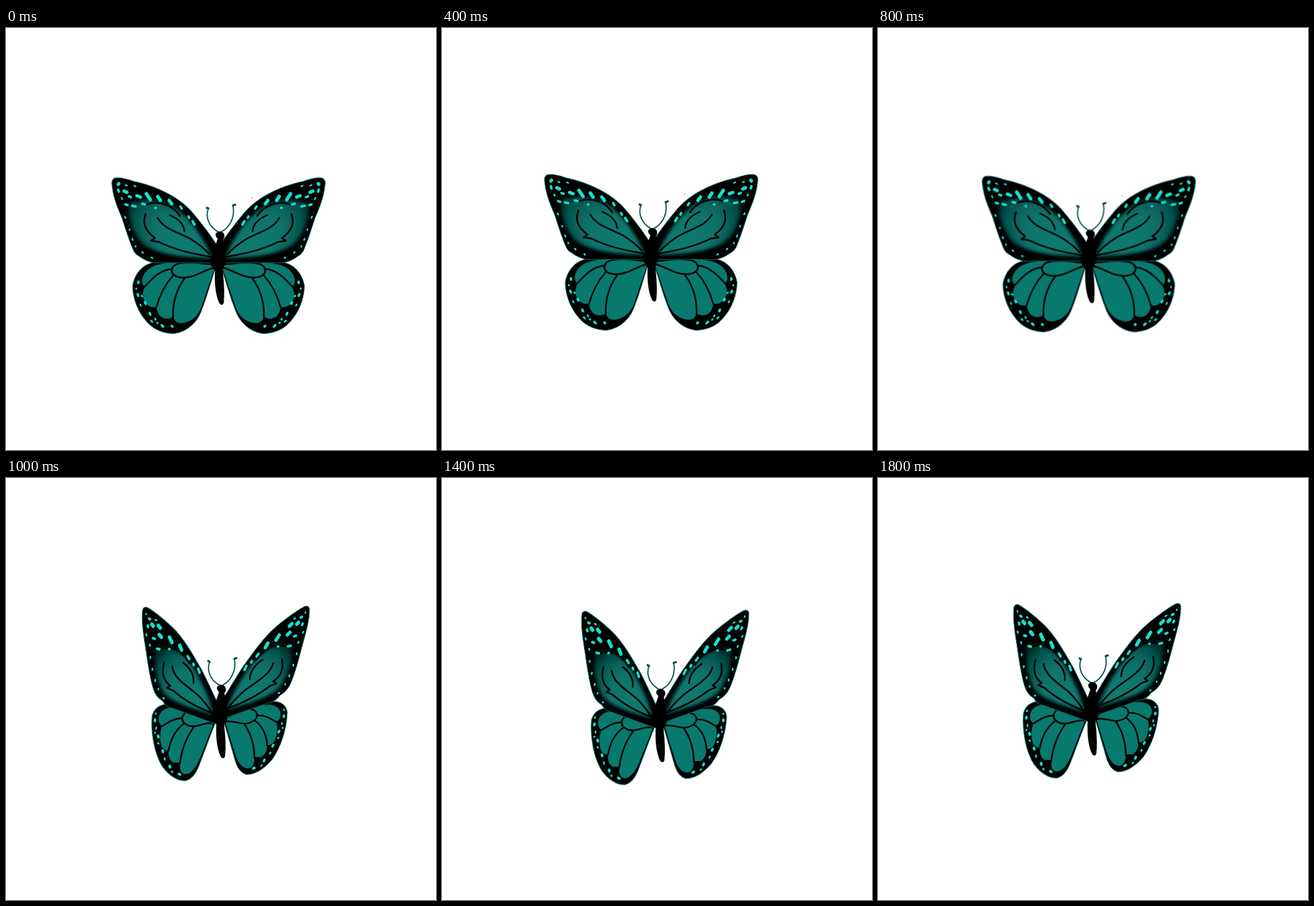
Animation, 642 px wide and 629 px high, one loop 2000 ms. Source, as an HTML page without scripts:

```html
<!DOCTYPE html>
<html lang="en">
<head>
<meta charset="utf-8">
<title>Butterfly</title>
<style>
  html, body { margin: 0; width: 100%; height: 100%; overflow: hidden; background: #fff; }
  svg { display: block; width: 642px; height: 629px; }
  .edge { fill: #000; stroke: #0b6f66; stroke-width: 1; }
  .vein { fill: none; stroke: #000; stroke-width: 2.4; stroke-linecap: round; stroke-linejoin: round; }
  .spots { fill: none; stroke: #16e0cf; stroke-linecap: round; }
  .big { stroke-width: 5; }
  .mid { stroke-width: 3.7; }
  .small { stroke-width: 2.5; }
  .cells { fill: #08796f; }
  .antenna { fill: none; stroke: #07504c; stroke-width: 1.8; stroke-linecap: round; }
  .knob { stroke-width: 3.4; }

  .butterfly { animation: drift 2s step-end infinite; }
  .open, .raised { animation: flap .4s step-end infinite; }
  .raised { animation-delay: -.2s; }

  @keyframes flap { 0% { visibility: visible; } 50%, 100% { visibility: hidden; } }
  @keyframes drift {
    0%   { transform: translate(0, 0); }
    10%  { transform: translate(-2px, -3px); }
    20%  { transform: translate(-5px, -5px); }
    30%  { transform: translate(-6px, -8px); }
    40%  { transform: translate(-2.5px, -2.5px); }
    50%  { transform: translate(2px, 5px); }
    60%  { transform: translate(5px, 6.5px); }
    70%  { transform: translate(7px, 11px); }
    80%  { transform: translate(7.5px, 9.5px); }
    90%  { transform: translate(1px, 1px); }
    100% { transform: translate(0, 0); }
  }
</style>
</head>
<body>
<svg viewBox="0 0 642 629">
  <defs>
    <radialGradient id="open-shade" gradientUnits="userSpaceOnUse" cx="0" cy="0" r="1" gradientTransform="translate(362 322) rotate(-36) scale(112 66)">
      <stop offset="0" stop-color="#087b71"/>
      <stop offset=".5" stop-color="#08736b"/>
      <stop offset=".8" stop-color="#06554f"/>
      <stop offset="1" stop-color="#021f1d"/>
    </radialGradient>
    <radialGradient id="raised-shade" gradientUnits="userSpaceOnUse" cx="0" cy="0" r="1" gradientTransform="translate(352 315) rotate(-50) scale(98 64)">
      <stop offset="0" stop-color="#087b71"/>
      <stop offset=".5" stop-color="#08736b"/>
      <stop offset=".8" stop-color="#06554f"/>
      <stop offset="1" stop-color="#021f1d"/>
    </radialGradient>
    <filter id="soft"><feGaussianBlur stdDeviation="2.5"/></filter>

    <!-- right wings, spread -->
    <g id="open-lower">
      <path class="edge" d="M320 349H412C431 352 442 366 445.500 384C445 408 434 430 418 444C408 452 396 455 385 455.500C367 454 350 441 343 422C335 402 329 380 322 358Z"/>
      <path class="cells" d="M324 355C345 347 380 347 404 352C422 355 433 368 431 380Q430 384 427 386Q433 396 428 407Q422 418 410 416Q408 431 397 433Q390 434 385 430Q383 440 372 440C358 438 349 430 344 419C337 400 331 380 324 361Z"/>
      <path class="vein" d="M324 357C343 363 355 373 372 372C391 371 393 353 373 350.500C358 349 345 350 332 352M386 359C404 360 416 373 428 386M385 369C397 382 405 398 410 416M367 372C379 388 386 408 385 431"/>
      <path class="spots mid" d="M437 378v2M438 397l-1 2M427 409l-1 2M420 425l-1 2M402 443l-2 2M387 444l-1 1"/>
      <path class="spots small" d="M440 388v1M432 399l-1 1M434 412l-1 2M412 433l-1 2M418 436l-2 2M409 439l-1 1"/>
    </g>
    <g id="open-upper">
      <path class="edge" d="M320 323C333 303 346 287 357 274C378 250 413 235 444 228.500C456 224 468 222 473 224Q478 227 476 236C474 255 466 272 461 284C456 300 450 318 444 332Q441 338 436 340Q424 349 412 350H320Z"/>
      <path filter="url(#soft)" fill="url(#open-shade)" d="M328 340C338 316 352 295 370 278C388 259 420 252 450 260C456 276 446 304 432 320C416 335 380 342 328 343Z"/>
      <path class="vein" d="M426 277C432 293 425 304 412 313L418 317L406 319C382 331 358 336 329 341M408 283C400 299 378 304 358 315Q342 325 331 337M390 279C378 284 369 291 368 303M427 264C406 255 384 266 375 280"/>
      <path class="spots big" d="M419 256l6-9M404 257l4-6M387 262l4-5M434 252l5-2M454 245l4-2M466 232l1 1"/>
      <path class="spots mid" d="M372 269l2-3M353 293l3-5M361 283l1-2M427 263l4-1M441 266l5-1M453 264l3-1M411 268h.5M467 241l-1 3M448 252l3-1"/>
      <path class="spots small" d="M441 236l2-1M454 235l2-1M462 253l-1 2M457 281l-1 2M450 300v1M446 314l-1 2M441 325v1M430 335l1-1M416 343l1-1"/>
    </g>

    <!-- right wings, raised -->
    <g id="raised-lower">
      <path class="edge" d="M320 352C340 334 365 327 398 325Q414 327 416 341C415 367 406 394 393 412C380 427 367 434 355 434Q344 431 339 416C333 396 328 377 322 358Z"/>
      <path class="cells" d="M326 351C340 337 367 331 389 330Q404 331 406 342Q406 352 400 355Q403 371 397 384Q392 391 386 390Q386 403 377 408L367 408Q367 424 357 425C345 424 340 410 336 396C331 382 327 367 324 358Z"/>
      <path class="vein" d="M325 355C338 353 350 362 362 356C375 350 373 338 360 336C348 335 339 340 330 347M371 346C382 345 390 350 400 356M368 354C379 362 385 375 386 391M352 359C361 372 367 389 367 410"/>
      <path class="spots mid" d="M411 346v2M404 369l-1 2M395 390l-1 2M382 412l-1 2M367 424l-2 1"/>
      <path class="spots small" d="M411 337v1M408 357v2M403 379l-1 1M391 401l-1 2M378 420l-1 1M409 364v1"/>
    </g>
    <g id="raised-upper">
      <path class="edge" d="M319 323C332 302 340 288 350 273C365 252 382 228 400 213C418 198 436 186 443 183Q450 182 449 190C449 205 443 225 438 243C433 262 428 282 421 298Q416 310 405 316Q398 326 388 327L320 351Z"/>
      <path filter="url(#soft)" fill="url(#raised-shade)" d="M326 336C334 311 350 287 366 266C380 249 401 235 424 241C426 260 416 290 404 305C388 320 352 330 326 337Z"/>
      <path class="vein" d="M408 262C411 278 406 288 395 295L400 298L390 302C371 317 350 327 328 335M395 268C390 286 370 295 352 309Q339 320 329 333M379 263C367 271 360 281 360 292M415 243C396 237 379 249 369 264"/>
      <path class="spots big" d="M399 234l5-8M383 245l4-7M416 226l4-4M419 213l4-4M430 210l3-3"/>
      <path class="spots mid" d="M370 258l3-4M352 278l3-6M426 228l3-1M417 243l4-1M402 243h.5M436 200l2-1M362 267l1-2M439 209l-1 2"/>
      <path class="spots small" d="M443 192v1M440 221l-1 2M426 202l2-1M433 236l-1 2M430 253v2M425 270v2M419 286v2M413 299v1M403 313l1-1"/>
    </g>
  </defs>

  <g class="butterfly">
    <g class="open">
      <g transform="matrix(-1 0 0 1 634.5 0)"><use href="#open-lower"/><use href="#open-upper"/></g>
      <use href="#open-lower"/><use href="#open-upper"/>
      <path d="M366 254l2-2M344 293l2-2" stroke="#2fb5a8" stroke-width="1"/>
    </g>
    <g class="raised">
      <g transform="translate(2 3)">
        <use href="#raised-lower" transform="matrix(-1.01 .05 -.115 1.065 673.5 -36.9)"/>
        <use href="#raised-upper" transform="matrix(-.976 .029 -.104 1.056 657.6 -21.4)"/>
        <use href="#raised-lower"/><use href="#raised-upper"/>
      </g>
    </g>
    <path d="M316 314Q312 310 313 307Q315 303 319.500 303Q325 304 326 308Q327 312 324 316Q327 324 326 332Q331 341 327 352Q323 359 324 366Q327 392 325 410Q323 415 319 411C313 400 311 380 312 362Q304 353 305 345Q311 336 312 326Z"/>
    <path class="antenna" d="M317 304C304 297 297 283 302 269M321 304C335 297 342 281 339 265"/>
    <path class="antenna knob" d="M300 268l2 1M339 264.500l3-1"/>
  </g>
</svg>
</body>
</html>
```
